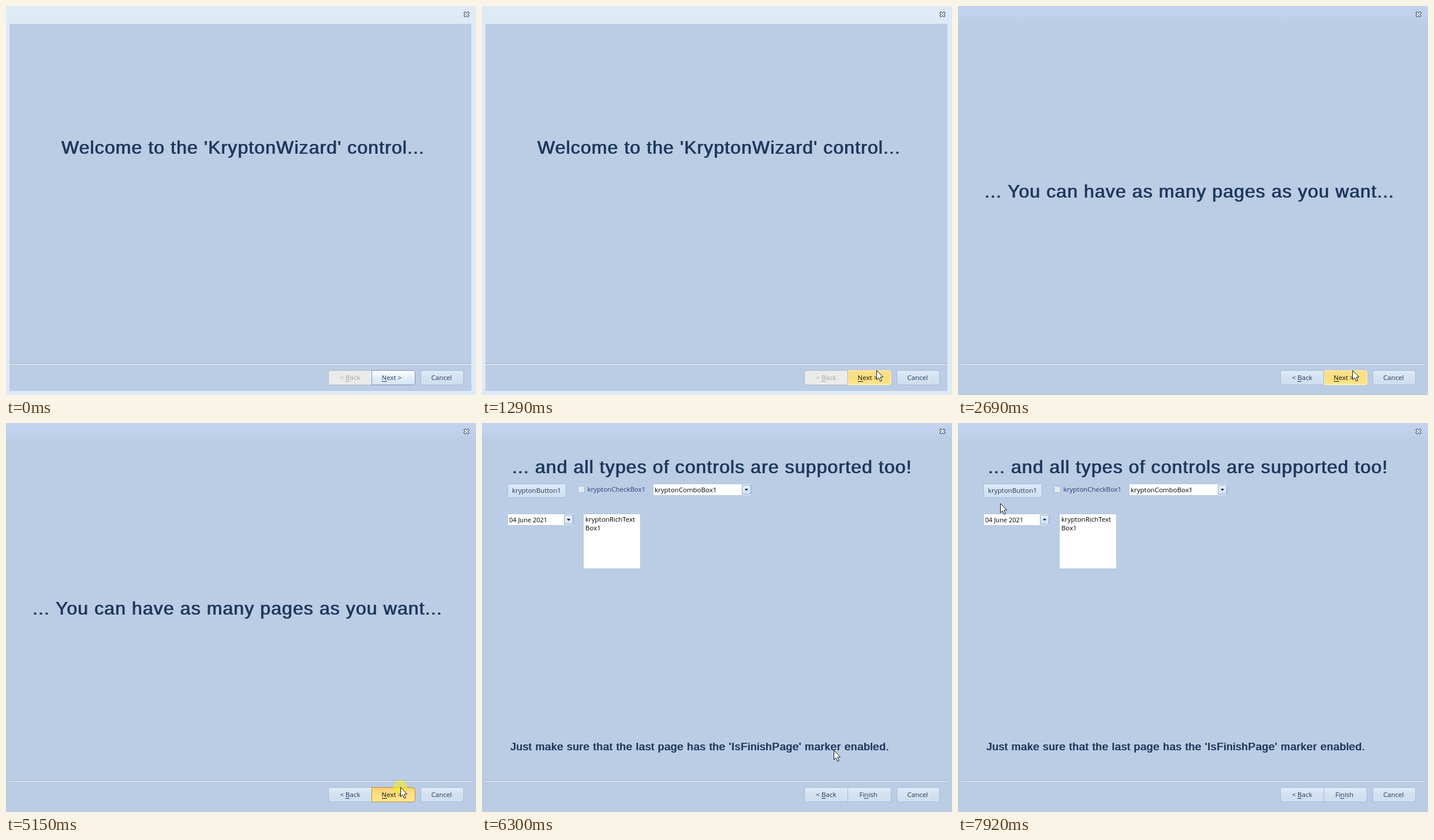
Animation, 814 px wide and 674 px high, one loop 8000 ms. Source, as an HTML page with a canvas:

```html
<!DOCTYPE html>
<html lang="en">
<head>
<meta charset="utf-8">
<title>Wizard control</title>
<style>
html, body { margin: 0; width: 100%; height: 100%; overflow: hidden; background: #bbcce5; }
canvas { display: block; }
</style>
</head>
<body>
<canvas id="stage" width="814" height="674"></canvas>
<script>
const ctx = document.getElementById('stage').getContext('2d');
const LOOP = 8000, STEP = 70;
const INK = '#1e395b';

// Pointer: sampled movement phases [start, steps] over a path of [time, x, y].
const PHASES = [[460, 4], [870, 7], [5950, 12], [6800, 12], [7640, 5]];
const PATH = [
  [460, 764, 667], [530, 752, 660], [670, 732, 646], [870, 727, 642], [1010, 716, 630],
  [1220, 687, 630], [1290, 683, 631], [5880, 683, 631], [5950, 680, 628], [6090, 660, 609],
  [6300, 609, 567], [6720, 410, 445], [7360, 148, 257], [7570, 116, 203], [7920, 73, 139]
];

function pointerAt(t) {
  const phase = PHASES.filter(p => p[0] <= t).pop();
  if (!phase) return null;
  const [start, steps] = phase;
  const time = start + STEP * Math.min(Math.floor((t - start) / STEP), steps - 1);
  const i = PATH.findIndex(p => p[0] >= time);
  const b = PATH[i], a = PATH[Math.max(0, i - 1)];
  const f = b === a ? 0 : (time - a[0]) / (b[0] - a[0]);
  return { x: Math.round(a[1] + (b[1] - a[1]) * f), y: Math.round(a[2] + (b[2] - a[2]) * f) };
}

function rect(x, y, w, h, color) {
  ctx.fillStyle = color;
  ctx.fillRect(x, y, w, h);
}

function vertical(y, h, ...colors) {
  const g = ctx.createLinearGradient(0, y, 0, y + h);
  colors.forEach((c, i) => g.addColorStop(i / (colors.length - 1), c));
  return g;
}

function box(x, y, w, h, fill, border, radii = 0) {
  ctx.beginPath();
  ctx.roundRect(x + .5, y + .5, w - 1, h - 1, radii);
  ctx.fillStyle = fill;
  ctx.fill();
  ctx.strokeStyle = border;
  ctx.lineWidth = 1;
  ctx.stroke();
}

function label(text, x, y, color = INK, size = 11.5) {
  ctx.font = size + 'px "Open Sans", "Noto Sans", sans-serif';
  ctx.letterSpacing = '0px';
  ctx.fillStyle = color;
  ctx.fillText(text, x, y);
}

// Emboldened by drawing twice, one pixel apart.
function heading(text, x, y, size = 32, spacing = 1.09) {
  ctx.font = size + 'px "Liberation Sans", Arial, sans-serif';
  ctx.letterSpacing = spacing + 'px';
  ctx.fillStyle = INK;
  ctx.fillText(text, x, y);
  ctx.fillText(text, x + 1, y);
}

const LOOKS = {
  normal: [['#e1ecf8', '#d3e1f1', '#cfddee'], '#a6bad6'],
  primary: [['#ffffff', '#e6effa', '#d3e3f6'], '#7e93b8'],
  disabled: [['#ebebeb', '#ebebeb'], '#b5b8bd'],
  hover: [['#fae08a', '#f9de7e', '#fce58a'], '#f7e292'],
  pressed: [['#f3cf72', '#ffe086', '#ffe48c'], '#bd8f3a']
};

function button(x, w, radii, look, text, tx, mark) {
  const [colors, border] = LOOKS[look];
  box(x, 631, w, 26, vertical(631, 26, ...colors), border, radii);
  if (look === 'hover') {
    ctx.beginPath();
    ctx.roundRect(x + 1.5, 632.5, w - 3, 23, radii.map(r => r && r - 1));
    ctx.strokeStyle = vertical(632, 24, '#fbe9a4', '#fff8cc');
    ctx.stroke();
  }
  const color = look === 'disabled' ? '#a3a3a3' : look === 'hover' || look === 'pressed' ? '#101010' : INK;
  label(text, tx, 648, color);
  if (mark >= 0) {
    const before = ctx.measureText(text.slice(0, mark)).width;
    rect(Math.round(tx + before), 650, Math.round(ctx.measureText(text[mark]).width), 1, color);
  }
}

function dropDown(x, y, w, text, size) {
  box(x, y, w, 21, '#fff', '#b1c5e0');
  label(text, x + 3, y + 15, '#000', size);
  box(x + w - 17, y + 2, 16, 17, vertical(y + 2, 17, '#e3eefa', '#cfdff1'), '#86a3c9');
  ctx.fillStyle = '#101820';
  ctx.beginPath();
  ctx.moveTo(x + w - 12, y + 9);
  ctx.lineTo(x + w - 6, y + 9);
  ctx.lineTo(x + w - 9, y + 12.5);
  ctx.fill();
}

function closeIcon() {
  for (const [color, width, d] of [['#465064', 4, 0], ['#fff', 2, .8]]) {
    ctx.strokeStyle = color;
    ctx.lineWidth = width;
    ctx.beginPath();
    ctx.moveTo(793.5 + d, 10.8 + d); ctx.lineTo(801.5 - d, 18.2 - d);
    ctx.moveTo(801.5 - d, 10.8 + d); ctx.lineTo(793.5 + d, 18.2 - d);
    ctx.stroke();
  }
}

function windowFrame(active) {
  if (active) {
    rect(0, 0, 814, 674, '#dfeaf7');
    rect(6, 31, 800, 636, '#bbcce5');
  } else {
    rect(0, 0, 814, 674, '#bbcce5');
    rect(0, 0, 814, 30, vertical(0, 30, '#c2d4ed', '#c0d2eb', '#bbcce5'));
  }
  rect(6, 619, 800, 1, '#a0a0a0');
  rect(6, 620, 800, 1, '#fff');
  closeIcon();
}

function controlsPage() {
  heading('... and all types of controls are supported too!', 51.5, 87);
  box(44, 105, 102, 25, vertical(105, 25, '#dce9f7', '#cddef0'), '#a3bad8', 2);
  label('kryptonButton1', 52, 121);
  box(166, 109, 12, 12, '#f4f6f9', '#9fb2cc');
  box(168, 111, 8, 8, '#e9edf2', '#d3d9e2');
  label('kryptonCheckBox1', 182.5, 119, '#2b3f78');
  dropDown(296, 105, 171, 'kryptonComboBox1');
  dropDown(44, 157, 115, '04 June 2021', 11);
  box(175, 157, 100, 96, '#fff', '#b1c5e0');
  label('kryptonRichText', 179, 171, '#000');
  label('Box1', 179, 186, '#000');
  heading("Just make sure that the last page has the 'IsFinishPage' marker enabled.", 49, 567, 18.67, .76);
}

function pointer({ x, y }) {
  ctx.save();
  ctx.translate(x + .5, y + .5);
  ctx.beginPath();
  [[0, 0], [0, 16], [3.6, 12.6], [6.2, 18.6], [8.8, 17.5], [6.3, 11.6], [11, 11.3]]
    .forEach(p => ctx.lineTo(...p));
  ctx.closePath();
  ctx.fillStyle = '#fff';
  ctx.fill();
  ctx.strokeStyle = '#111';
  ctx.lineWidth = 1;
  ctx.stroke();
  ctx.restore();
}

function draw(t) {
  const page = t < 2620 ? 1 : t < 5350 ? 2 : 3;
  const clicking = (t >= 2420 && t < 2620) || (t >= 5150 && t < 5350);
  const p = pointerAt(t);
  const over = (x, w) => p && p.x >= x && p.x < x + w && p.y >= 630 && p.y < 657;

  windowFrame(t < 2420);
  if (page === 1) heading("Welcome to the 'KryptonWizard' control...", 95.5, 256);
  else if (page === 2) heading('... You can have as many pages as you want...', 45.5, 332);
  else controlsPage();

  const nextLook = clicking ? 'pressed' : over(633, 76) ? 'hover' : page === 3 ? 'normal' : 'primary';
  button(558, 76, [4, 0, 0, 4], t < 2690 ? 'disabled' : 'normal', '< Back', 578.5, 2);
  if (page === 3) button(633, 76, [0, 4, 4, 0], nextLook, 'Finish', 653.5, 2);
  else button(633, 76, [0, 4, 4, 0], nextLook, 'Next >', 650.5, 0);
  if (nextLook === 'hover') rect(633, 631, 1, 26, '#a3b1c4');
  button(718, 75, [4, 4, 4, 4], over(718, 75) ? 'hover' : 'normal', 'Cancel', 736.5, -1);

  if (clicking) {
    ctx.fillStyle = 'rgba(244, 234, 40, .62)';
    ctx.beginPath();
    ctx.arc(683, 631, 12, 0, Math.PI * 2);
    ctx.fill();
  }
  if (p) pointer(p);
}

const began = performance.now();
function tick() {
  draw((performance.now() - began) % LOOP);
  requestAnimationFrame(tick);
}
tick();
</script>
</body>
</html>
```
